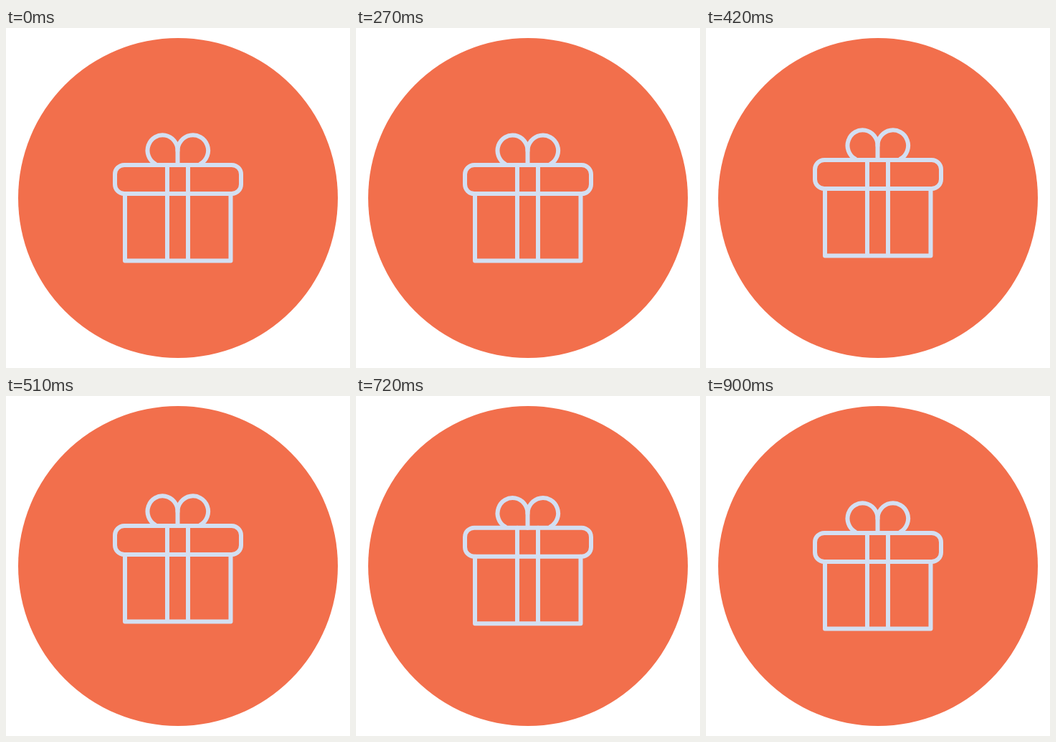
Write an HTML page that moves like this. It is 480 px wide and 474 px high and loops after 0.99 s.

```html
<!DOCTYPE html>
<html lang="en">
<head>
<meta charset="utf-8">
<title>Bobbing gift</title>
<style>
  html, body { margin: 0; width: 100%; height: 100%; overflow: hidden; background: #fff; }
  svg { display: block; width: 100%; height: 100%; }
</style>
</head>
<body>
<svg viewBox="0 0 480 474">
  <circle cx="240" cy="237" r="223" fill="#f26f4c"/>
  <g id="gift" fill="none" stroke="#d3dff2" stroke-width="6" stroke-linecap="round" stroke-linejoin="round">
    <path d="M239.5 191V171A21 21.5 0 1 0 208 189.5"/>
    <path d="M239.5 171A21.3 21.5 0 1 1 271.5 189.5"/>
    <rect x="152" y="191" width="176" height="40" rx="13"/>
    <path d="M166 231V324.5H313.5V231M225 191V324.5M254 191V324.5"/>
  </g>
</svg>
<script>
  const LOOP = 990, PERIOD = 900, STEP = 30;
  const LOW_TIME = 150, HIGH_TIME = 560, LOW = 2.7, HIGH = -10.5;
  const gift = document.getElementById('gift');

  const ease = u => (1 - Math.cos(Math.PI * u)) / 2;

  // The gift sinks, rises, then falls back through its starting height.
  function offset(t) {
    const rising = t >= LOW_TIME && t < HIGH_TIME;
    if (rising) return LOW + (HIGH - LOW) * ease((t - LOW_TIME) / (HIGH_TIME - LOW_TIME));
    const since = (t - HIGH_TIME + PERIOD) % PERIOD;
    return HIGH + (LOW - HIGH) * ease(since / (PERIOD + LOW_TIME - HIGH_TIME));
  }

  function draw() {
    const t = Math.floor(performance.now() % LOOP / STEP) * STEP;
    gift.setAttribute('transform', `translate(0 ${offset(Math.min(t, PERIOD)).toFixed(2)})`);
    requestAnimationFrame(draw);
  }
  draw();
</script>
</body>
</html>
```
